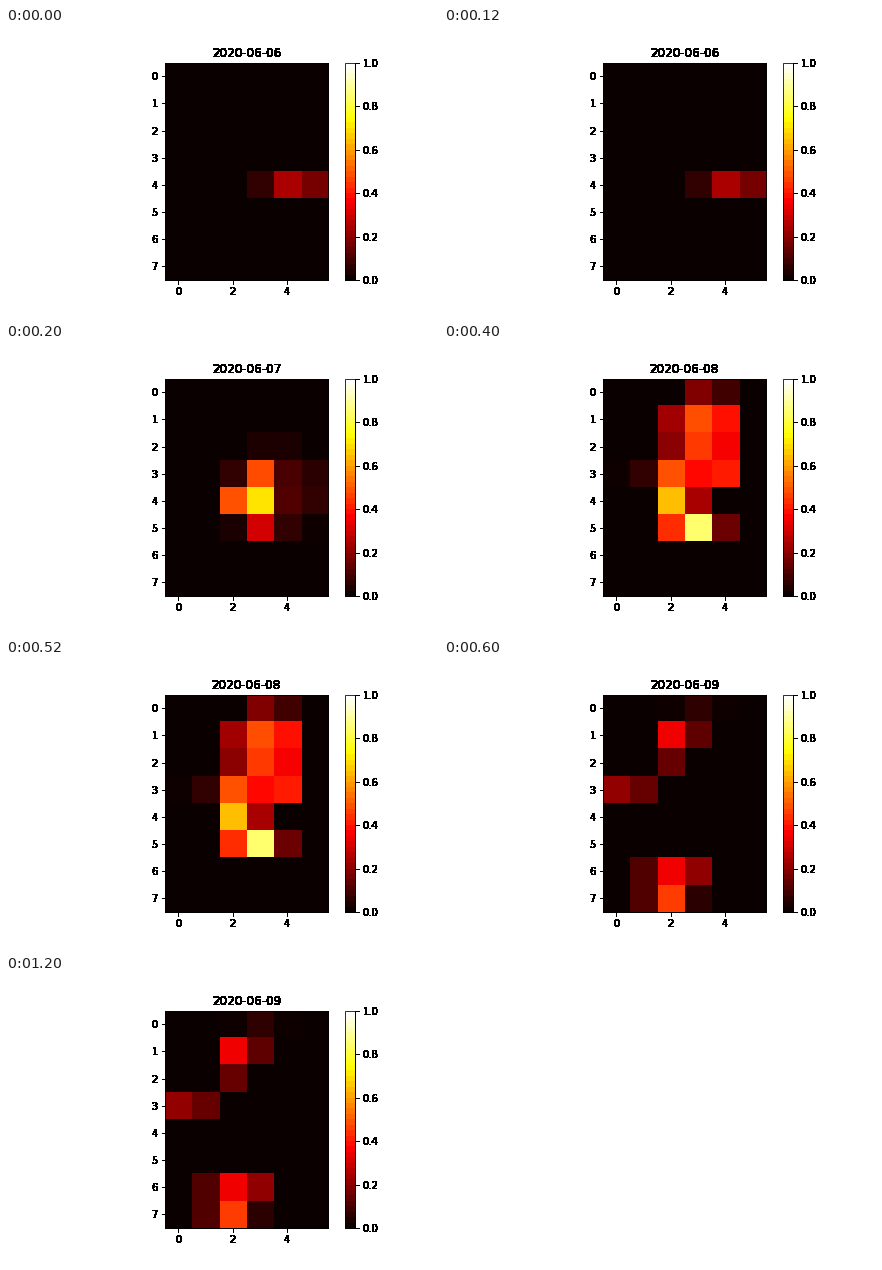
Animation, 432 px wide and 288 px high, one loop 1600 ms. Source, as a matplotlib script:

```python
import numpy as np
import matplotlib.pyplot as plt
from matplotlib.animation import FuncAnimation
from matplotlib.cm import ScalarMappable

STEP = 200    # ms per frame
FRAMES = 8    # four days, the last one held
ROWS, COLS = 8, 6
Y, X = np.mgrid[:ROWS, :COLS]


def spot(row, col, peak, tall=1, wide=1.1):
    """Heat dome that falls to zero at its row and column reach."""
    dome = 1 - ((Y - row) / tall) ** 2 - ((X - col) / wide) ** 2
    return peak * np.clip(dome, 0, 1)


def blend(*spots):
    return np.max(spots, axis=0)


DAYS = [
    blend(spot(4, 4.2, .245, wide=1.38)),
    blend(spot(4, 2.75, .73, wide=1.3),
          spot(3.86, 3, .71, tall=1.5, wide=1),
          spot(3.7, 3.4, .12, tall=2, wide=2.3)),
    blend(spot(1.4, 3.23, .52, tall=1.75, wide=1.72),
          spot(3.93, 2.12, .66, tall=1.85),
          spot(3, 3.55, .46, wide=1.3),
          spot(5, 3, .855),
          spot(3, 1, .06)),
    blend(spot(1.13, 2.13, .355, tall=1.13),
          spot(3, 0, .205, wide=1.78),
          spot(6, 2.12, .35, wide=1.35),
          spot(7, 1.96, .455),
          spot(0, 3, .055)),
]


def solid(img, dpi):
    """Make every touched pixel opaque, keeping its colour."""
    out = img.copy()
    out[..., 3] = img[..., 3] > 0
    return out, 0, 0


plt.rcParams.update({"font.family": "DejaVu Sans", "font.size": 10,
                     "text.kerning_factor": 6})
fig, ax = plt.subplots(figsize=(6, 4), dpi=72, facecolor="white")
fig.subplots_adjust(left=.125, right=.9, bottom=.125, top=.88)

heat = ax.imshow(DAYS[0], cmap="hot", vmin=0, vmax=1)
ax.set_xticks(range(0, COLS, 2))
ax.set_yticks(range(ROWS))
title = ax.set_title("2020-06-06")

bar = fig.colorbar(ScalarMappable(cmap=plt.get_cmap("hot", 40)), ax=ax)
bar.set_ticks(np.linspace(0, 1, 6))

for axes in fig.axes:
    axes.set_agg_filter(solid)


def update(i):
    day = min(i, len(DAYS) - 1)
    heat.set_data(DAYS[day])
    title.set_text(f"2020-06-{6 + day:02d}")
    return heat, title


anim = FuncAnimation(fig, update, frames=FRAMES, interval=STEP,
                     init_func=lambda: update(0), repeat=True, repeat_delay=0)
plt.show()
```
